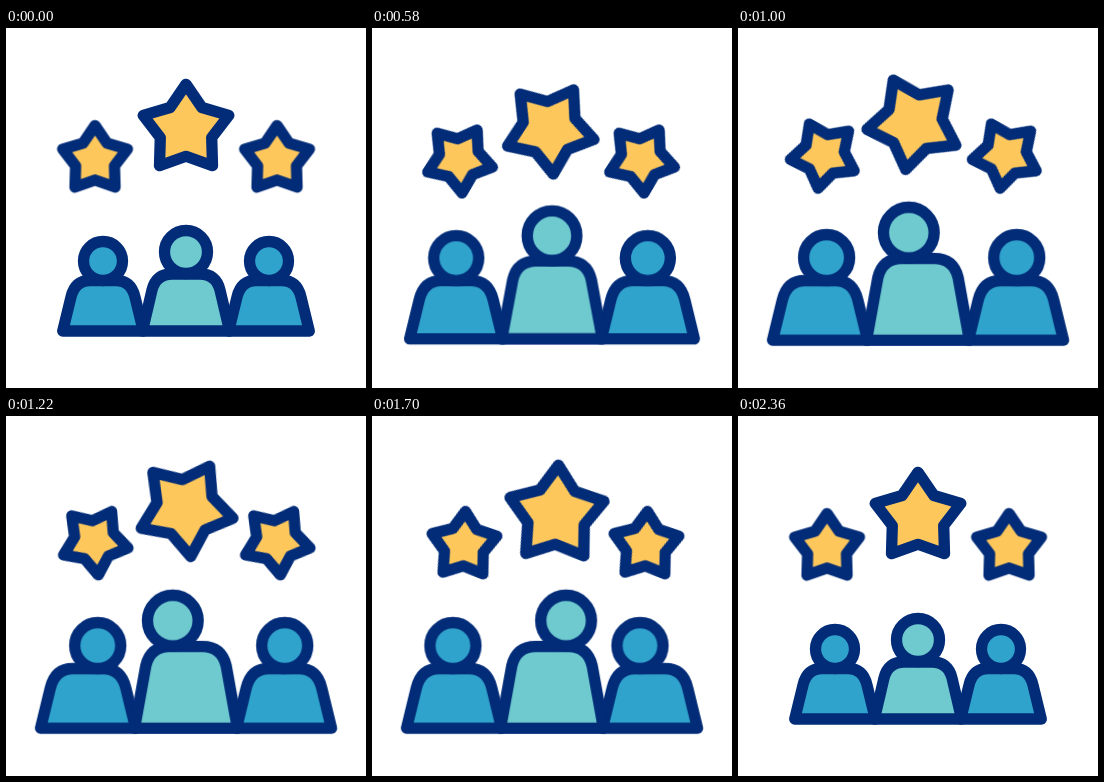
These frames come from a looping animation (360x360 px, 2400 ms). An HTML page:

```html
<!DOCTYPE html>
<html lang="en">
<head>
<meta charset="utf-8">
<title>Team rating</title>
<style>
  :root {
    --navy: #022c78;
    --gold: #fdc75b;
    --blue: #30a3cc;
    --teal: #6ecacf;
    --ease: cubic-bezier(.333, 0, .667, 1);
  }
  html, body { margin: 0; width: 100%; height: 100%; overflow: hidden; background: #fff; }
  svg { display: block; width: 100%; height: 100%; }

  .crowd, .star { stroke: var(--navy); stroke-width: 11.3; stroke-linejoin: round; }
  .star { fill: var(--gold); }
  .small { stroke-width: 14.9; }
  .side { fill: var(--blue); }
  .lead { fill: var(--teal); }

  .crowd, .lift, .torso, .head, .spin, .swell, .spark {
    animation: 2400ms var(--ease) infinite;
  }

  /* Stroke widths shrink as groups grow, so that lines keep their weight. */
  .crowd { transform-origin: 180px 252px; animation-name: grow; }
  @keyframes grow {
    0%, 8.333%, 91.667%, 100% { transform: scale(1); stroke-width: 11.3; }
    29.167%, 70.833% { transform: scale(1.18); stroke-width: 9.6; }
  }

  .lift { animation-name: lift; }
  @keyframes lift {
    0%, 8.333%, 91.667%, 100% { transform: translateY(0); }
    29.167%, 70.833% { transform: translateY(-12.2px); }
  }

  .torso { animation-name: stretch; }
  @keyframes stretch {
    0%, 8.333%, 91.667%, 100% {
      d: path("M136.400 303L146 262Q150 246 166 246L194 246Q210 246 214 262L223.600 303Z");
    }
    29.167%, 70.833% {
      d: path("M136.400 303L146 249.8Q150 233.8 166 233.8L194 233.8Q210 233.8 214 249.8L223.600 303Z");
    }
  }

  /* Each head leans to --a, then to --b, then settles. */
  .head { animation-name: sway; }
  @keyframes sway {
    0%, 31.667%, 91.667%, 100% { transform: translateX(0); }
    48.333% { transform: translateX(var(--a)); }
    71.667% { transform: translateX(var(--b)); }
  }

  .spin { animation-name: spin; }
  @keyframes spin {
    0%, 8.333% { transform: rotate(0deg); }
    95.417%, 100% { transform: rotate(360deg); }
  }

  .swell { animation-name: swell; }
  @keyframes swell {
    0%, 12.5%, 95.417%, 100% { transform: scale(1); stroke-width: 11.3; }
    68.75% { transform: scale(1.1); stroke-width: 10.3; }
  }

  .spark {
    fill: none;
    stroke: var(--gold);
    stroke-width: 8.5;
    stroke-linecap: round;
    stroke-dasharray: 52 300;
    animation-name: shoot;
    animation-timing-function: linear;
  }
  @keyframes shoot {
    0%, 77.49% { stroke-dashoffset: 51; opacity: 0; }
    77.5% { stroke-dashoffset: 51; opacity: 1; }
    91.66% { stroke-dashoffset: -99; opacity: 1; }
    91.67%, 100% { stroke-dashoffset: -99; opacity: 0; }
  }
</style>
</head>
<body>
<svg viewBox="0 0 360 360">
  <defs>
    <path id="star" d="M0-40.7L15.9-17.5 42.8-9.6 25.7 12.6 26.5 40.7 0 31.3-26.5 40.7-25.7 12.6-42.8-9.6-15.9-17.5Z"/>
    <path id="body" d="M56.700 303L65 269Q69 252.5 84 252.5H110Q125 252.5 129 269L137.300 303Z"/>
  </defs>

  <path class="spark" pathLength="100" d="M137 79.5L110.5 53"/>
  <path class="spark" pathLength="100" d="M222.5 79.5L249 53"/>
  <path class="spark" pathLength="100" d="M159.5 149.5L133 176"/>
  <path class="spark" pathLength="100" d="M204 149.5L230.5 176"/>

  <g class="star">
    <g transform="translate(89 128.3)"><g class="spin"><use href="#star" class="small" transform="scale(.756)"/></g></g>
    <g transform="translate(271 128.3)"><g class="spin"><use href="#star" class="small" transform="scale(.756)"/></g></g>
    <g transform="translate(180 97)"><g class="spin"><g class="swell"><use href="#star"/></g></g></g>
  </g>

  <g class="crowd">
    <g class="side">
      <use href="#body"/>
      <use href="#body" x="166"/>
      <circle class="head" style="--a: 8.5px; --b: -1px" cx="97" cy="233" r="19.5"/>
      <circle class="head" style="--a: 1px; --b: -8.5px" cx="263" cy="233" r="19.5"/>
    </g>
    <g class="lead">
      <path class="torso" d="M136.400 303L146 262Q150 246 166 246L194 246Q210 246 214 262L223.600 303Z"/>
      <g class="lift">
        <circle class="head" style="--a: -12px; --b: 12px" cx="180" cy="224" r="21.5"/>
      </g>
    </g>
  </g>
</svg>
</body>
</html>
```
